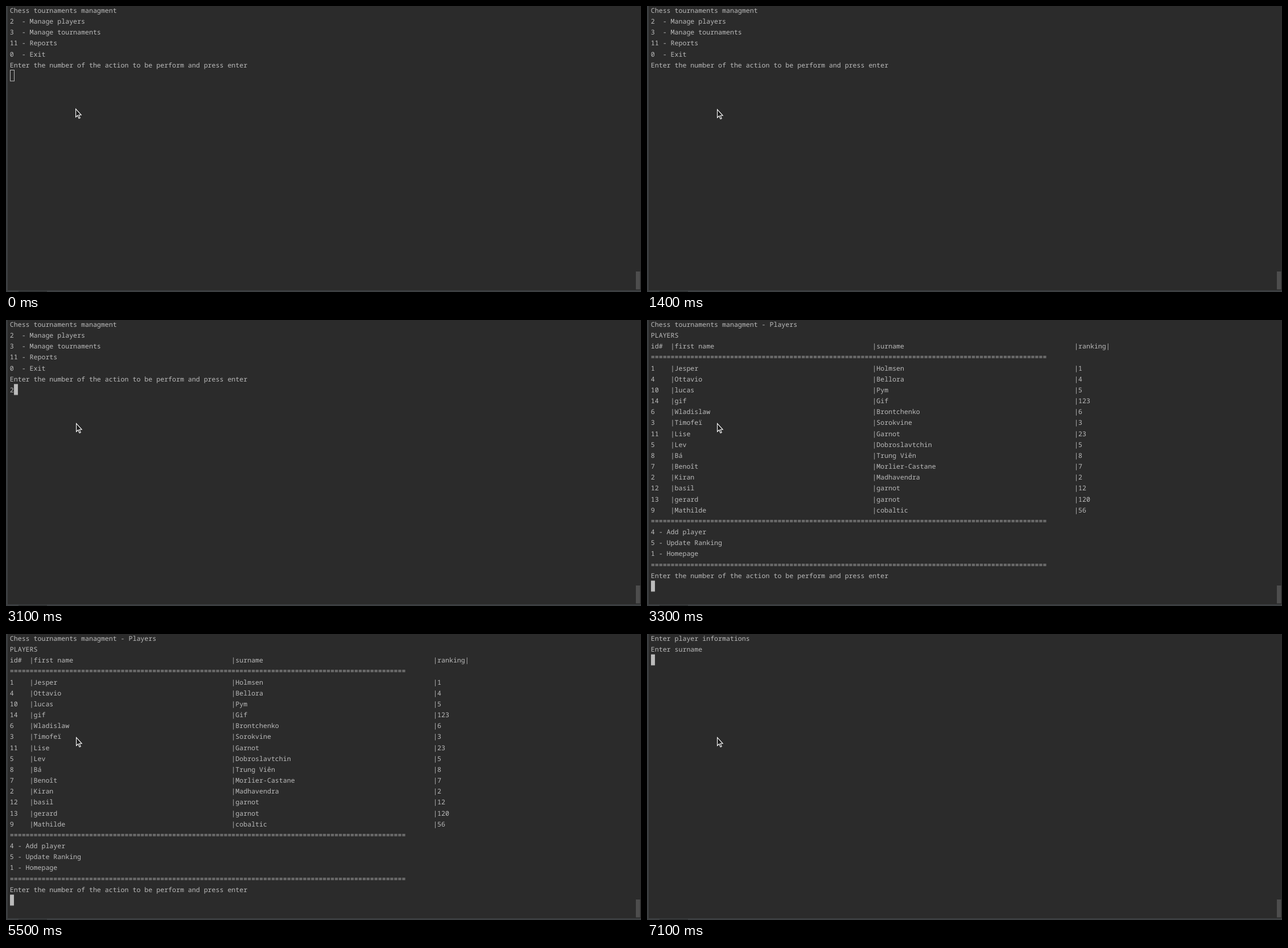
These frames come from a looping animation (1116x502 px, 8000 ms). An HTML page:

```html
<!DOCTYPE html>
<html lang="en">
<head>
<meta charset="utf-8">
<title>Chess tournaments console</title>
<style>
  html, body { margin: 0; width: 100%; height: 100%; overflow: hidden; background: #2b2b2b; }
  svg { display: block; width: 1116px; height: 502px; }
  text {
    font: 11.6px "Noto Sans Mono", "DejaVu Sans Mono", monospace;
    fill: #bbb;
    white-space: pre;
    text-rendering: geometricPrecision;
    font-variant-ligatures: none;
  }
  .chrome { fill: #3c3f41; }
  .block { fill: #bbb; }
  .hollow { fill: none; stroke: #bbb; }
  .arrow { fill: #1c1c1c; stroke: #fff; stroke-width: 1.1; }

  #home, #players, #form, #key2, #key4, .hollow, .block, .arrow {
    animation: 8s step-end infinite;
  }
  #home { animation-name: home; }
  #players { animation-name: players; }
  #form { animation-name: form; }
  #key2 { animation-name: key2; }
  #key4 { animation-name: key4; }
  .hollow { animation-name: unfocused; }
  .block { animation-name: caret; }
  .arrow { animation-name: nudge; }

  @keyframes home { 0% { opacity: 1 } 41.25%, 100% { opacity: 0 } }
  @keyframes players { 0% { opacity: 0 } 41.25% { opacity: 1 } 88.75%, 100% { opacity: 0 } }
  @keyframes form { 0% { opacity: 0 } 88.75%, 100% { opacity: 1 } }
  @keyframes key2 { 0% { opacity: 0 } 38.75%, 100% { opacity: 1 } }
  @keyframes key4 { 0% { opacity: 0 } 82.5%, 100% { opacity: 1 } }
  @keyframes unfocused { 0% { opacity: 1 } 6.25%, 100% { opacity: 0 } }
  @keyframes nudge {
    0% { transform: translate(122px, 180px) }
    8.75%, 100% { transform: translate(123px, 181px) }
  }
  /* blinking block: row 6 on the home screen, row 24 under the table, row 2 on the form */
  @keyframes caret {
    0% { opacity: 0; transform: translate(7px, 112.4px) }
    6.25% { opacity: 1; transform: translate(7px, 112.4px) }
    17.5% { opacity: 0; transform: translate(7px, 112.4px) }
    26.25% { opacity: 1; transform: translate(7px, 112.4px) }
    32.5% { opacity: 0; transform: translate(7px, 112.4px) }
    37.5% { opacity: 1; transform: translate(7px, 112.4px) }
    38.75% { opacity: 1; transform: translate(13.96px, 112.4px) }
    41.25% { opacity: 1; transform: translate(7px, 457.5px) }
    47.5% { opacity: 0; transform: translate(7px, 457.5px) }
    55% { opacity: 1; transform: translate(7px, 457.5px) }
    63.75% { opacity: 0; transform: translate(7px, 457.5px) }
    68.75% { opacity: 1; transform: translate(7px, 457.5px) }
    75% { opacity: 0; transform: translate(7px, 457.5px) }
    81.25% { opacity: 1; transform: translate(7px, 457.5px) }
    82.5% { opacity: 1; transform: translate(13.96px, 457.5px) }
    88.75%, 100% { opacity: 1; transform: translate(7px, 35.8px) }
  }
</style>
</head>
<body>
<svg viewBox="0 0 1116 502">
  <rect width="1116" height="502" fill="#2b2b2b"/>
  <rect class="chrome" width="3" height="502"/>
  <rect class="chrome" y="499" width="1116" height="3"/>
  <rect x="22" y="500" width="50" height="2" fill="#2d2f30"/>
  <rect x="1107" y="466" width="7.5" height="31.5" fill="#4d4d4d"/>
  <g id="home"><g id="key2"></g></g>
  <g id="players"><g id="key4"></g></g>
  <g id="form"></g>
  <rect class="hollow" x="7.5" y="112.5" width="7" height="19.2"/>
  <rect class="block" width="6.96" height="19.2"/>
  <path class="arrow" d="M.6 .7V15L3.8 12 6.1 17.3 8.2 16.4 6 11.3H10.2Z"/>
</svg>
<script>
  const PROMPT = "Enter the number of the action to be perform and press enter";
  const RULE = "=".repeat(100);

  const roster = [
    ["1", "Jesper", "Holmsen", "1"],
    ["4", "Ottavio", "Bellora", "4"],
    ["10", "lucas", "Pym", "5"],
    ["14", "gif", "Gif", "123"],
    ["6", "Wladislaw", "Brontchenko", "6"],
    ["3", "Timofeï", "Sorokvine", "3"],
    ["11", "Lise", "Garnot", "23"],
    ["5", "Lev", "Dobroslavtchin", "5"],
    ["8", "Bá", "Trung Viên", "8"],
    ["7", "Benoît", "Morlier-Castane", "7"],
    ["2", "Kiran", "Madhavendra", "2"],
    ["12", "basil", "garnot", "12"],
    ["13", "gerard", "garnot", "120"],
    ["9", "Mathilde", "cobaltic", "56"]
  ];

  const tableRow = ([id, first, last, rank]) =>
    id.padEnd(5) + "|" + first.padEnd(50) + "|" + last.padEnd(50) + "|" + rank;

  function print(id, lines, firstRow = 0) {
    const group = document.getElementById(id);
    lines.forEach((line, i) => {
      const el = document.createElementNS("http://www.w3.org/2000/svg", "text");
      el.setAttribute("x", 6.8);
      el.setAttribute("y", (11.9 + (firstRow + i) * 19.17).toFixed(2));
      el.textContent = line;
      group.append(el);
    });
  }

  print("home", [
    "Chess tournaments managment",
    "2  - Manage players",
    "3  - Manage tournaments",
    "11 - Reports",
    "0  - Exit",
    PROMPT
  ]);
  print("key2", ["2"], 6);

  print("players", [
    "Chess tournaments managment - Players",
    "PLAYERS",
    tableRow(["id#", "first name", "surname", "ranking|"]),
    RULE,
    ...roster.map(tableRow),
    RULE,
    "4 - Add player",
    "5 - Update Ranking",
    "1 - Homepage",
    RULE,
    PROMPT
  ]);
  print("key4", ["4"], 24);

  print("form", ["Enter player informations", "Enter surname"]);
</script>
</body>
</html>
```
